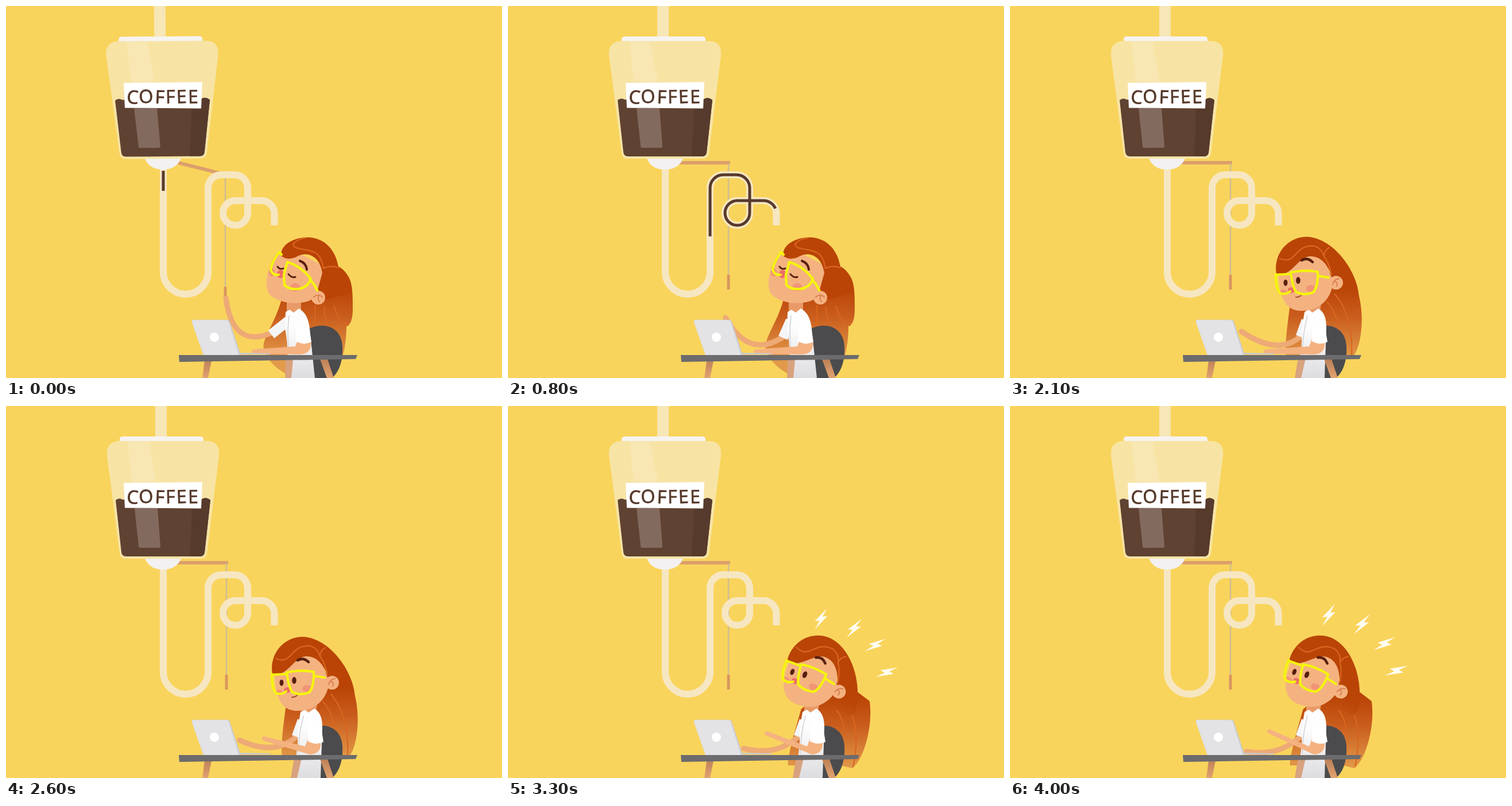
Animation of 864 by 648 pixels, one loop 4.1 s. Source, as an HTML page:

```html
<!DOCTYPE html>
<html lang="en">
<head>
<meta charset="utf-8">
<title>Coffee drip</title>
<style>
  html, body { margin: 0; width: 100%; height: 100%; overflow: hidden; background: #f9d45c; }
  svg { display: block; width: 864px; height: 648px; }
  .line { fill: none; stroke-linecap: round; stroke-linejoin: round; }
  .skin { stroke: #eeaa76; stroke-width: 9.5; }
  .strand { stroke: #d9661f; stroke-width: 2.2; }
  .dark { stroke: #57200f; stroke-width: 3; }
  .frame { stroke: #f5f50a; stroke-width: 4.2; }
  .face { fill: #f4b280; }
  .blush { fill: #f08a74; opacity: .75; }
  .label { font: 500 32px "Open Sans", "Noto Sans", sans-serif; letter-spacing: 2.4px; fill: #553829; stroke: #553829; stroke-width: .8; stroke-linejoin: round; }
</style>
</head>
<body>
<svg viewBox="0 0 864 648">
  <defs>
    <linearGradient id="hair" gradientUnits="userSpaceOnUse" x1="0" y1="490" x2="0" y2="615">
      <stop stop-color="#b94406"/><stop offset=".4" stop-color="#c95c1c"/><stop offset="1" stop-color="#e29a4a"/>
    </linearGradient>
    <linearGradient id="shirt" gradientUnits="userSpaceOnUse" x1="0" y1="560" x2="0" y2="648">
      <stop stop-color="#fdfdfd"/><stop offset="1" stop-color="#dddde1"/>
    </linearGradient>
    <linearGradient id="wood" gradientUnits="userSpaceOnUse" x1="0" y1="616" x2="0" y2="648">
      <stop stop-color="#bd8158"/><stop offset="1" stop-color="#e2a271"/>
    </linearGradient>
    <path id="bolt" fill="#fffdf4" d="M11-19-11 4-2 3-11 19 12-5 3-4Z"/>
  </defs>

  <!-- lever and pull cord -->
  <path id="rod" d="M298 273H387" stroke="#dc9f6c" stroke-width="6"/>
  <g id="cord">
    <path d="M384 274V470" stroke="#d0bd92" stroke-width="2.6"/>
    <rect x="381.500" y="468" width="5" height="26" rx="1.500" fill="#d9965f"/>
  </g>

  <!-- tube -->
  <path class="line" id="tube" stroke="#f6e7c2" stroke-width="12" style="stroke-linecap:butt"
    d="M274 282V463A39 39 0 0 0 352 463V317A23 23 0 0 1 375 294H398A23 23 0 0 1 421 317V360.500A21.500 21.500 0 1 1 399.500 339H445A22.500 22.500 0 0 1 467.500 361.500V382"/>
  <path class="line" id="coffee" stroke="#573a2c" stroke-width="5" style="stroke-linecap:butt"/>

  <!-- bottle -->
  <g id="bottle">
    <path d="M260 0H280V56H260Z" fill="#f7e6b6"/>
    <path d="M198 64V58Q198 53 204 53H338Q344 53 344 58V64Z" fill="#f6f3f1"/>
    <path d="M240 260H307Q300 285 273.500 285T240 260Z" fill="#f3f1f1"/>
    <path d="M196 61H351Q373 62 371 86L350 257Q348 266 340 266H208Q200 266 198 257L176 86Q174 63 196 61Z" fill="#f7e4a5"/>
    <path d="M212 62H248L261 133H219Z" fill="#f8e7b2"/>
    <path d="M191 164Q197 159 203 163H340Q348 157 356 164L346 255Q345 262 338 262H209Q202 262 201 255Z" fill="#604232"/>
    <path d="M324 163H340Q348 157 356 164L346 255Q345 262 338 262H320Q324 215 324 163Z" fill="#563a2c"/>
    <path d="M224 178H264L269 244Q269 247 266 247H234Q231 247 231 244Z" fill="#836a5e"/>
  </g>
  <path d="M205 134 342 132.500 340 178.500 207 177.500Z" fill="#fff"/>
  <text class="label" x="210" y="169.500" rotate="3 -3 2 -1 -2 -1">COFFEE</text>

  <!-- long hair, two poses -->
  <g id="hairA">
    <path fill="url(#hair)" d="M481 505C474 545 444 580 449 598C455 620 480 640 500 645H560C584 640 593 595 593 558Q604 554 604 528C604 505 604 487 598 474Q588 455 570 450L510 480Z"/>
    <path class="line strand" d="M538 522Q540 545 536 558M554 524Q554 546 562 558M571 522Q580 553 596 556"/>
  </g>
  <g id="hairB">
    <path fill="url(#hair)" d="M489 512C484 550 478 590 481 610H572L594 615C612 600 619 540 606 498L550 460Z"/>
    <path class="line strand" d="M552 515Q566 530 572 558M566 502C590 530 597 570 595 612"/>
  </g>

  <path d="M527 562Q557 550 575 566Q588 578 586 605Q584 634 568 648H534Z" fill="#4b4b4d"/>

  <!-- body -->
  <path class="line skin" id="farArm"/>
  <path id="farSleeve" stroke="#f5f5f7" stroke-width="17" fill="none"/>
  <g id="torso">
    <path d="M489 508H514V536L500 543 489 534Z" fill="#e99a68"/>
    <path d="M487 533 494 529 501 534 510 527Q526 535 529 562L538 648H487Q494 600 486 562Z" fill="url(#shirt)"/>
    <path class="line" d="M493 540Q489 570 493 605" stroke="#cfcfd5" stroke-width="1.500"/>
    <path d="M487 616H500L497 648H486Z" fill="#d8a27e"/>
  </g>
  <path class="face" id="nearArm"/>
  <path id="nearSleeve" d="M506 552Q524 540 528 560L532 585Q520 592 505 584Z" fill="#fff"/>

  <!-- head tilted back -->
  <g id="headA">
    <path class="face" d="M470 432C456 452 447 490 460 503C476 518 506 521 527 514C548 505 556 475 551 452L500 425Z"/>
    <path fill="#b94406" d="M480 436C476 415 504 402 528 403C556 405 574 425 579 454Q598 462 602 500L555 512 543 494 551 465C546 432 521 427 506 437Q492 444 480 436Z"/>
    <path class="line strand" d="M500 414C500 427 530 421 542 432Q550 439 553 457Q565 451 579 456M501 414Q507 406 522 404"/>
    <circle class="face" cx="544" cy="508" r="12"/>
    <path class="line" d="M536 507Q544 500 551 507M545 504Q542 511 546 515" stroke="#da8055" stroke-width="2"/>
    <ellipse class="blush" cx="504" cy="490" rx="9" ry="7"/>
    <ellipse class="blush" cx="463" cy="464" rx="5" ry="7"/>
    <ellipse cx="478" cy="467" rx="6" ry="7" fill="#ed6c68"/>
    <path class="line dark" d="M473 454Q477 460 483 457M492 467Q497 474 504 472"/>
    <path class="line dark" d="M512 444Q523 448 524 459" style="stroke-width:4"/>
    <path class="line frame" d="M476 429Q463 445 461 459Q464 470 475 468M477 430 480 433M484 468 490 446Q512 452 531 475Q526 491 508 493Q492 494 485 486ZM529 477Q536 482 542 495"/>
    <path id="mouth" d="M474 499Q480 494 485 500Q480 505 474 505Z" fill="#4c2a1e"/>
  </g>

  <!-- head upright -->
  <g id="headB">
    <path class="face" d="M468 460C468 492 472 531 507 531C540 531 560 510 563 480L545 435 500 435Z"/>
    <path fill="url(#hair)" d="M464 468C458 430 485 402 517 402C565 404 607 465 608 508C598 518 574 510 562 492L560 470C553 449 540 435 522 436C501 438 490 472 464 468Z"/>
    <path class="line strand" d="M470 440C500 452 494 415 530 418Q543 422 547 436Q547 426 556 421M547 436Q556 448 560 468"/>
    <circle class="face" cx="568" cy="482" r="12"/>
    <path class="line" d="M562 485Q564 476 573 475M566 480Q572 482 569 488" stroke="#da8055" stroke-width="2"/>
    <ellipse class="blush" cx="524" cy="492" rx="8" ry="6"/>
    <ellipse class="blush" cx="476" cy="499" rx="6" ry="5"/>
    <ellipse cx="490" cy="495" rx="6" ry="5" fill="#ed6c68"/>
    <ellipse cx="480" cy="482" rx="3.500" ry="5.500" fill="#57200f"/>
    <ellipse cx="502" cy="478" rx="3.800" ry="6" fill="#57200f"/>
    <path class="line dark" d="M508 443Q518 437 527 446" style="stroke-width:4.500"/>
    <path class="line" id="smile" d="M498 507Q505 508 508 502" stroke="#a54d32" stroke-width="2"/>
    <path class="line frame" d="M463 467Q463 496 472 501Q481 503 488 497M463 468 487 467M489 464Q511 459 536 463Q537 489 528 499Q512 505 498 498Q492 488 489 464ZM536 470 555 473"/>
  </g>

  <!-- desk and laptop -->
  <path d="M346 618H358L352 648H342ZM547 615H560L571 648H559Z" fill="url(#wood)"/>
  <path d="M301 608H612L609 615 302 620Z" fill="#6c6b6d"/>
  <path d="M400 604 460 605V607H400Z" fill="#c9c9ce"/>
  <path d="M327 546.500H385Q389 546.500 390 550L408 605V608H344L324 551Q323 547 327 546.500Z" fill="#cbcbd0"/>
  <path d="M327 547H383Q387 547 388 550L406 608H344L324 551Q323 547 327 547Z" fill="#e3e2e5"/>
  <circle cx="363" cy="577" r="8" fill="#fff"/>

  <g id="bolts"></g>
</svg>
<script>
const LOOP = 4100, STEP = 100;
const el = id => document.getElementById(id);
const set = (id, name, value) => el(id).setAttribute(name, value);
const show = (id, on) => set(id, 'display', on ? 'inline' : 'none');
const ramp = (t, a, b) => Math.min(1, Math.max(0, (t - a) / (b - a)));
const smooth = x => x * x * (3 - 2 * x);
const mix = (a, b, k) => a.map((v, i) => v + (b[i] - v) * k);

// Coffee keeps falling past the tube's end
set('coffee', 'd', el('tube').getAttribute('d') + 'V462');
const coffeeLength = el('coffee').getTotalLength();

// Far arm: cuff, bend, hand
const PULL = [462, 572, 395, 600, 383, 509];
const LOWER = [479, 578, 420, 618, 379, 543];
const KEYS = [479, 578, 455, 606, 412, 599];
const TYPE = [506, 576, 470, 612, 412, 602];

// Resting place, travel and turn of each bolt
const BOLTS = [[555, 364, 31, -21, 0], [613, 380, 31, -22, 9], [652, 414, 38, -7, 29], [673, 461, 41, -8, 37]];
el('bolts').innerHTML = '<use href="#bolt"/>'.repeat(BOLTS.length);

function drawMachine(t) {
  const pull = 1 - smooth(ramp(t, 400, 600));
  set('rod', 'transform', `rotate(${14 * pull} 300 273)`);
  set('cord', 'transform', `translate(${-2 * pull} ${21 * pull})`);
  set('bottle', 'transform', `rotate(${-.45 * pull} 272 280)`);

  const head = Math.min(coffeeLength, 40 + .9 * t);
  const tail = 5 + .9 * Math.max(0, t - 400);
  show('coffee', tail < head);
  set('coffee', 'stroke-dasharray', `0 ${tail} ${Math.max(0, head - tail)} 2000`);
}

function drawArms(t, lean) {
  const wave = .5 + .5 * Math.cos((t - 4000) / 333 * 2 * Math.PI);
  const nearLift = wave * ramp(t, 2100, 2500);
  const farLift = (1 - wave) * ramp(t, 1800, 2000);

  let far = mix(PULL, LOWER, ramp(t, 400, 800));
  far = mix(far, KEYS, ramp(t, 800, 1200));
  far = mix(far, TYPE, lean);
  far[4] -= 14 * farLift;
  far[5] -= 55 * farLift;
  const [cx, cy, bx, by, hx, hy] = far;
  set('farArm', 'd', `M${cx + 4} ${cy - 4}Q${bx} ${by} ${hx} ${hy}`);
  set('farSleeve', 'd', `M${492 + 24 * lean} 548L${cx} ${cy}`);

  // Near forearm narrows from the elbow to the hand
  const x = 17 * lean, handX = 430 + 14 * lean + 6 * nearLift, handY = 602 - 35 * nearLift;
  set('nearArm', 'd', `M${509 + x} 580L${531 + x} 582Q${534 + x} 606 ${512 + x} 607
    L${handX + 2} ${handY + 4}Q${handX - 7} ${handY - 1} ${handX + 2} ${handY - 4}L${504 + x} 593Z`);
  set('nearSleeve', 'transform', `translate(${21 * lean})`);
}

function drawGirl(t) {
  const lean = smooth(ramp(t, 1600, 2000));
  const back = t < 1800;
  const look = smooth(ramp(t, 2600, 3250));
  const tilt = 20 * (1 - smooth(ramp(t, 1800, 2100))) + 23 * look;

  for (const part of ['hair', 'head']) {
    show(part + 'A', back);
    show(part + 'B', !back);
  }
  show('mouth', t >= 900 && t < 1700);
  show('smile', look < .5);
  set('headA', 'transform', `translate(${24 * lean}) rotate(${-12 * lean} 500 525)`);
  set('headB', 'transform', `translate(${24 * (lean - 1) - 6 * look}) rotate(${tilt} 537 525)`);
  // The loose ends lag behind the head
  set('hairB', 'transform', `translate(${100 * look} ${16 * look}) skewX(${-8.7 * look})`);
  set('torso', 'transform', `matrix(1 0 ${-.14 * lean} 1 ${100.7 * lean} 0)`);
  drawArms(t, lean);
}

function drawBolts(t) {
  const u = ramp(t, 2700, 4100), left = (1 - u) ** 2;
  set('bolts', 'opacity', Math.min(1, u * 4));
  BOLTS.forEach(([x, y, dx, dy, turn], i) => el('bolts').children[i].setAttribute('transform',
    `translate(${x - dx * left} ${y - dy * left}) rotate(${turn}) scale(${1 - .15 * left})`));
}

function draw() {
  const t = Math.floor(performance.now() % LOOP / STEP) * STEP;
  drawMachine(t);
  drawGirl(t);
  drawBolts(t);
  requestAnimationFrame(draw);
}
draw();
</script>
</body>
</html>
```
